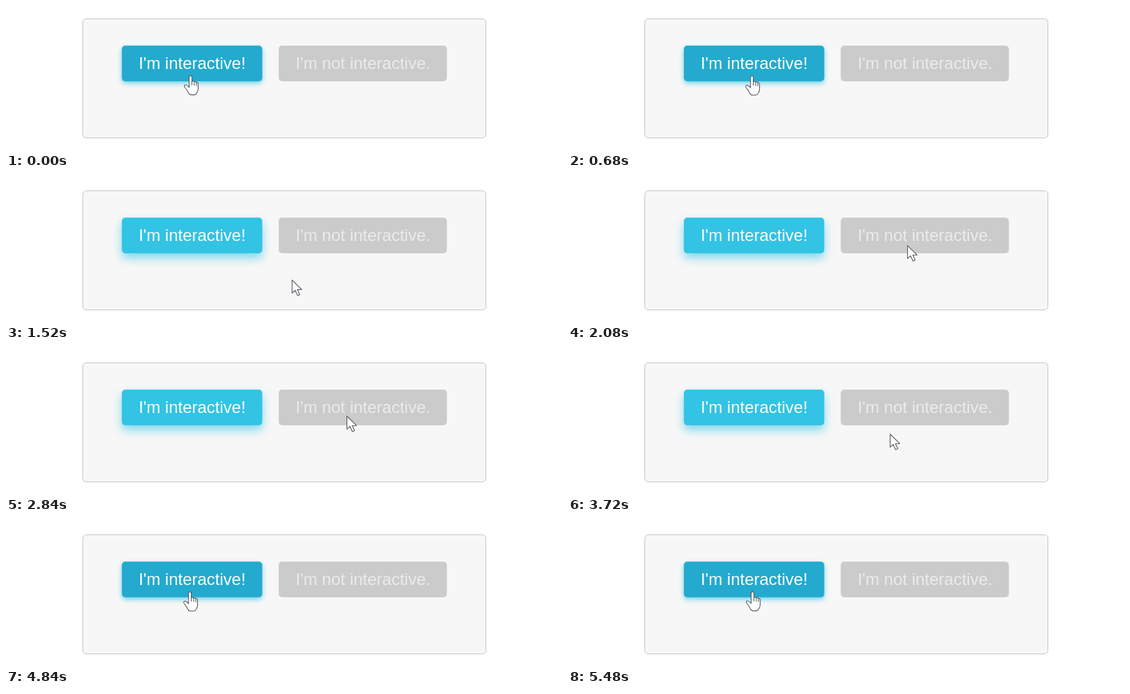
Recreate the animation shown at these times as an HTML page. Size 800 px wide and 208 px high, loop 5.52 s.

```html
<!DOCTYPE html>
<html lang="en">
<head>
<meta charset="utf-8">
<title>Button hover</title>
<style>
html, body { margin: 0; width: 100%; height: 100%; overflow: hidden; background: #fff; }
svg { display: block; }
text { font: 24px "Liberation Sans", Arial, sans-serif; text-anchor: middle; }
.cursor { fill: #fff; stroke: #555b63; stroke-width: 1.1; stroke-linejoin: round; stroke-linecap: round; }
</style>
</head>
<body>
<svg width="800" height="208" viewBox="0 0 800 208">
  <rect x="110.5" y="18.5" width="580" height="172" rx="5" fill="#f7f7f7" stroke="#c6c6c6"/>
  <rect id="button" x="166.7" y="57.3" width="202" height="51.4" rx="5"/>
  <text x="267.9" y="91.3" fill="#fff">I'm interactive!</text>
  <rect x="392.4" y="57.3" width="242" height="51.4" rx="5" fill="#cbcbcb"/>
  <text x="513.7" y="91.3" fill="#ebebeb">I'm not interactive.</text>
  <path id="arrow" class="cursor" d="M.5 .5V19.3L4.9 15.4L8.4 22.9L11.5 21.5L8.1 14.2H14.3Z"/>
  <g id="hand" class="cursor">
    <path d="M-.5 14V2.8Q-.5 .6 1.5 .6T3.5 2.8V9.2Q5 7.6 6.9 9.6Q8.8 8.4 10 10.4Q12.5 10 12.5 12.5V19Q12.5 22 11 24.5Q9.5 28.4 6 28.4H3Q0 28.4-1.5 25.5Q-3 22-6 18.5Q-8.6 15.3-6.8 14.2Q-4.8 13-.5 17.5Z"/>
    <path d="M3.5 9V14M6.9 9.8V14.5M10 10.6V15" fill="none"/>
  </g>
</svg>
<script>
const LOOP = 5520, STEP = 40;
// time, x, y of the pointer tip on the way out; the way back mirrors it
const path = [
  [640, 264, 100], [960, 257, 117], [1320, 352, 148],
  [1600, 432, 143], [1800, 463, 121], [2160, 490, 95]
];
const last = path.length - 1;
const $ = id => document.getElementById(id);
const clamp = v => Math.max(0, Math.min(1, v));
const mix = (a, b, k) => a + (b - a) * k;

function slope(i, axis) {
  if (i === 0 || i === last) return 0;
  const a = path[i - 1], b = path[i + 1];
  return (b[axis] - a[axis]) / (b[0] - a[0]);
}

// smooth curve through the key points
function tip(t) {
  const next = path.findIndex(p => p[0] > t);
  const i = next < 0 ? last - 1 : Math.max(0, next - 1);
  const a = path[i], b = path[i + 1], span = b[0] - a[0], k = clamp((t - a[0]) / span);
  return [1, 2].map(n => mix(a[n], b[n], k * k * (3 - 2 * k))
    + span * k * (1 - k) * ((1 - k) * slope(i, n) - k * slope(i + 1, n)));
}

function draw(now) {
  const t = Math.floor(now % LOOP / STEP) * STEP;
  const u = Math.min(t, LOOP - t);
  const [x, y] = tip(u);
  const hover = y < 108.5 && x < 369;
  const k = 1 - (1 - clamp((u - 780) / 260)) ** 2;
  const button = $("button").style;
  button.fill = `rgb(${mix(35, 50, k)},${mix(170, 195, k)},${mix(206, 229, k)})`;
  button.filter =
    `drop-shadow(0 ${mix(3, 7, k)}px ${mix(3.5, 7, k)}px rgba(50,195,229,${mix(.7, .6, k)}))`;
  $("hand").style.display = hover ? "" : "none";
  $("arrow").style.display = hover ? "none" : "";
  $(hover ? "hand" : "arrow").setAttribute("transform", `translate(${x} ${y})`);
  requestAnimationFrame(() => draw(performance.now() - start));
}

const start = performance.now();
draw(0);
</script>
</body>
</html>
```
